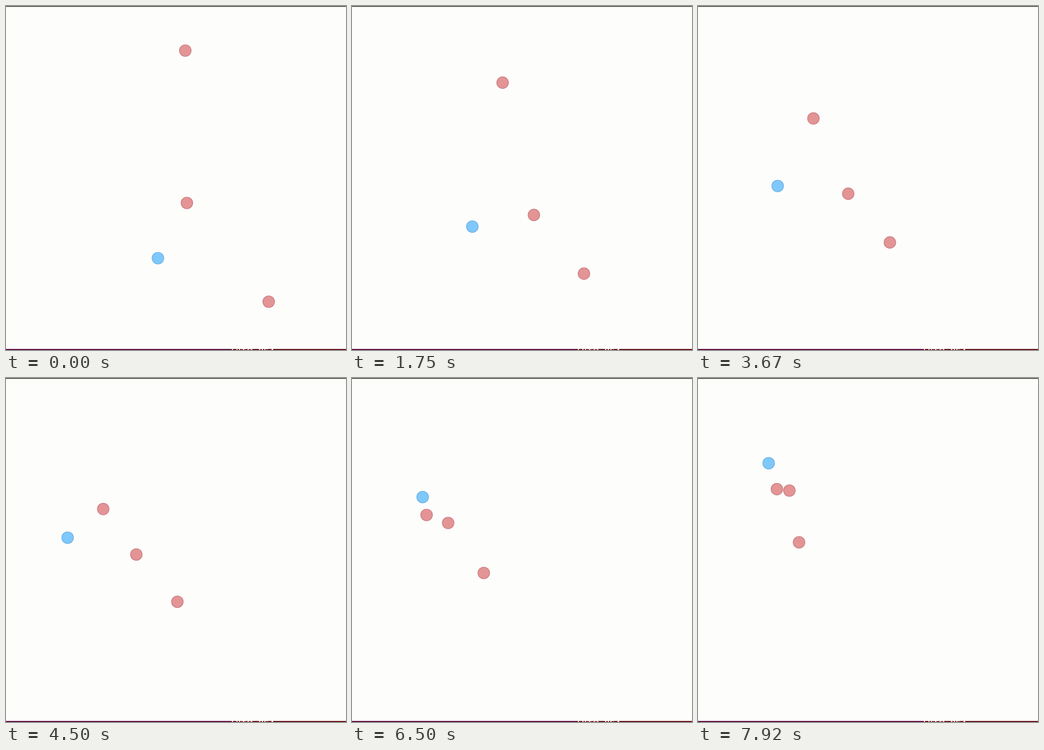
An HTML page with a canvas for the animation above (8000 ms loop, 640x648 px).

```html
<!DOCTYPE html>
<html lang="en">
<head>
<meta charset="utf-8">
<title>Chase</title>
<style>
  html, body { margin: 0; width: 100%; height: 100%; overflow: hidden; background: #fdfdfc; }
  canvas { display: block; }
</style>
</head>
<body>
<canvas id="stage" width="640" height="648"></canvas>
<script>
const ctx = document.getElementById('stage').getContext('2d');
const LOOP = 8000, TICK = 1000 / 12, SPEED = 4.25;

// Ticks on which the game stalls: [first, count]
const STALLS = [[7, 5], [19, 2], [31, 3], [43, 3], [63, 1], [70, 5], [82, 1], [93, 1]];

// Key points of each chaser: [step, x, y]
const CHASERS = [
  [[0, 337.5, 84], [32, 217.3, 211.8], [50, 154.8, 267.8], [59, 140.4, 258], [74, 148.5, 209.3]],
  [[0, 340.5, 371], [14, 342.4, 393.6], [32, 282.8, 353.6], [50, 209, 307], [59, 181, 273], [74, 172, 212]],
  [[0, 494.5, 557], [32, 361.2, 445.4], [50, 284.5, 397], [74, 190.2, 309.5]]
];

const clamp = (v, lo, hi) => Math.max(lo, Math.min(hi, v));

function stepAt(time) {
  const tick = Math.floor((time + 5) / TICK);
  return STALLS.reduce((s, [first, n]) => s - clamp(tick - first + 1, 0, n), tick);
}

// Always up; left for 40 steps, later briefly right
function runner(s) {
  const across = clamp(s - 48, 0, 4) - Math.min(s, 40);
  return [286 + SPEED * across, 475 - SPEED * s];
}

function slope(path, i, k) {
  return (path[i + 1][k] - path[i][k]) / (path[i + 1][0] - path[i][0]);
}

function tangent(path, i, k) {
  const last = path.length - 1;
  if (i === 0) return 2 * slope(path, 0, k) - tangent(path, 1, k);
  if (i === last) return 2 * slope(path, last - 1, k) - tangent(path, last - 1, k);
  const before = path[i][0] - path[i - 1][0], after = path[i + 1][0] - path[i][0];
  return (after * slope(path, i - 1, k) + before * slope(path, i, k)) / (before + after);
}

// Hermite curve, giving the chasers their inertia
function curve(path, s) {
  let i = 0;
  while (i < path.length - 2 && s >= path[i + 1][0]) i++;
  const a = path[i], b = path[i + 1];
  const h = b[0] - a[0], u = (s - a[0]) / h, v = 1 - u;
  return [1, 2].map(k =>
    v * v * (1 + 2 * u) * a[k] + u * u * (3 - 2 * u) * b[k] +
    h * u * v * (v * tangent(path, i, k) - u * tangent(path, i + 1, k)));
}

function rect(color, x, y, w, h) {
  ctx.fillStyle = color;
  ctx.fillRect(x, y, w, h);
}

function ball([x, y], fill, edge) {
  ctx.beginPath();
  ctx.arc(x, y, 11, 0, Math.PI * 2);
  ctx.fillStyle = fill;
  ctx.fill();
  ctx.lineWidth = 1.2;
  ctx.strokeStyle = edge;
  ctx.stroke();
}

function border() {
  rect('#40403a', 0, 0, 640, 1.5);
  rect('#5e0a40', 0, 646, 424, 2);
  rect('#6a1018', 424, 646, 216, 2);
  // Only the tops of the caption reach into view
  ctx.fillStyle = '#fff';
  ctx.font = '18px "Liberation Sans", sans-serif';
  ctx.fillText('HITS: 854', 424, 658);
}

function draw(now) {
  const s = stepAt(now % LOOP);
  rect('#fdfdfc', 0, 0, 640, 648);
  border();
  for (const path of CHASERS) ball(curve(path, s), '#e39494', '#c97b80');
  ball(runner(s), '#7fc8fb', '#68aee2');
}

let start;
function frame(now) {
  start ??= now;
  draw(now - start);
  requestAnimationFrame(frame);
}
draw(0);
requestAnimationFrame(frame);
</script>
</body>
</html>
```
